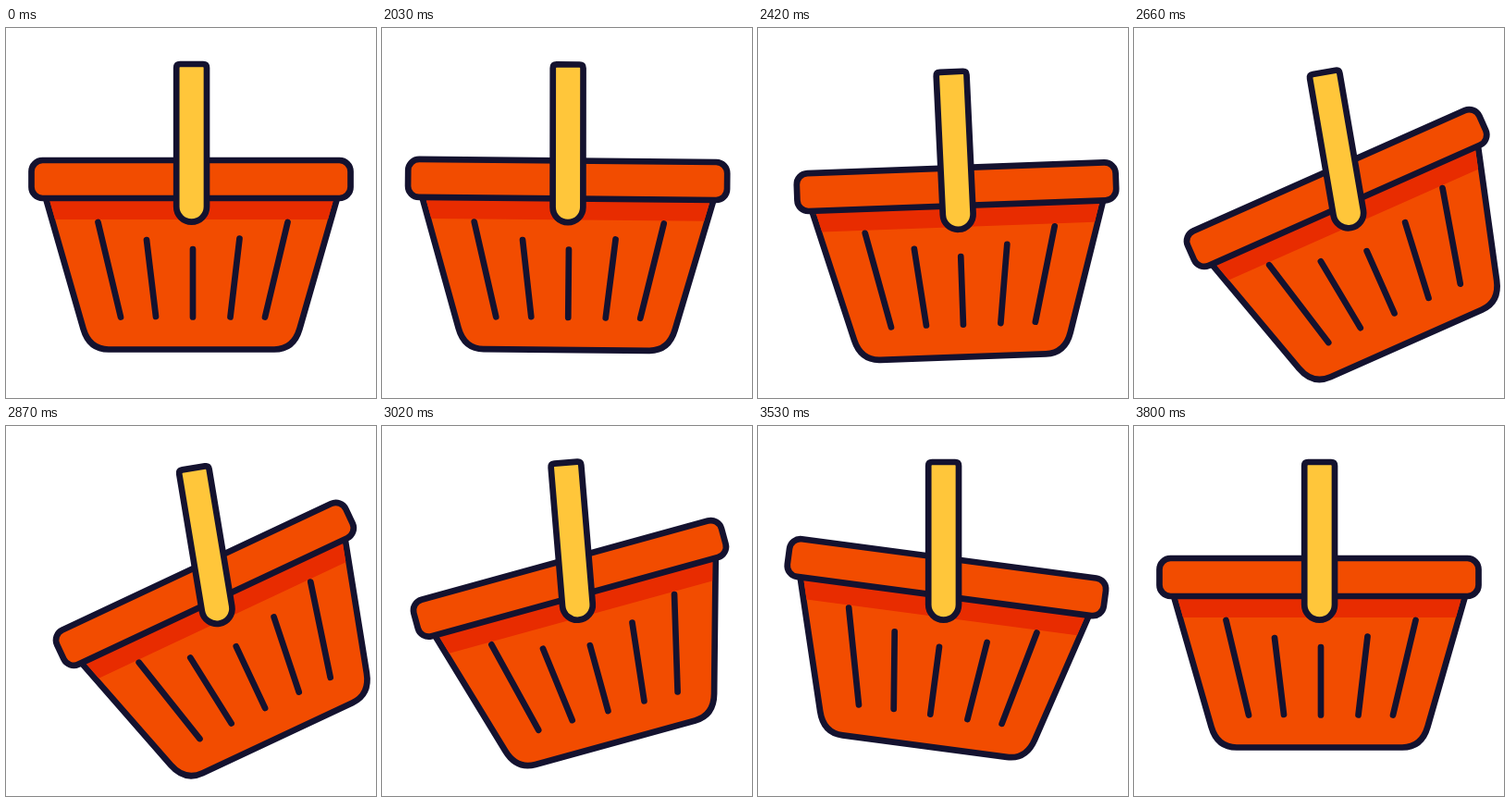
An HTML page that plays this animation: 400 by 400 pixels, repeating every 3830 ms.

```html
<!DOCTYPE html>
<html lang="en">
<head>
<meta charset="utf-8">
<title>Swinging basket</title>
<style>
  html, body { margin: 0; width: 100%; height: 100%; overflow: hidden; background: #fff; }
  svg { display: block; width: 100%; height: 100%; }
  .ink { stroke: #14122f; stroke-width: 6.7; stroke-linecap: round; stroke-linejoin: round; }
</style>
</head>
<body>
<svg viewBox="0 0 400 400">
  <g id="basket" class="ink" fill="#f24c00">
    <path d="M43 184L83.5 325Q90 347.5 111 347.5H290Q311 347.5 317.5 325L358 184Z"/>
    <path stroke="none" fill="#e82c00" d="M46.5 184H354.5L348 207H53Z"/>
    <path d="M99.5 210L124 312.5M152 229L162 312M202 239V312.5M252.5 227.5L242.5 312.5M304.5 210L280 312.5"/>
    <rect x="27.5" y="143" width="345" height="41" rx="12"/>
  </g>
  <path id="handle" class="ink" fill="#ffc63a"
    d="M188.2 39H213Q217 39 217 43V193.2A16.4 16.4 0 0 1 184.2 193.2V43Q184.2 39 188.2 39Z"/>
</svg>
<script>
const LOOP = 3830, PIVOT = '200.6 193.2';
const basket = document.getElementById('basket');
const handle = document.getElementById('handle');

// Smooth progress from 0 to 1 between two times
function ease(t, from, to) {
  const p = Math.min(1, Math.max(0, (t - from) / (to - from)));
  return (1 - Math.cos(Math.PI * p)) / 2;
}

function draw(t) {
  const lift = ease(t, 2000, 2208);
  const pull = ease(t, 2208, 2754);
  const rebound = ease(t, 2797, 3399);
  const settle = ease(t, 3399, 3800);

  const swing = 10 * (lift - settle) - 36.5 * (pull - rebound);
  const tilt = 1.2 * lift - 11.8 * pull + 10.6 * ease(t, 2770, 3240);
  const x = 7 * lift + 26 * pull - 33 * ease(t, 2754, 3190);
  const y = 9 * lift - 2.5 * pull - 6.5 * ease(t, 2754, 3050);

  const pose = (part, angle) =>
    part.setAttribute('transform', `translate(${x} ${y}) rotate(${angle} ${PIVOT})`);
  pose(basket, swing);
  pose(handle, tilt);
}

const start = performance.now();
function tick() {
  draw((performance.now() - start) % LOOP);
  requestAnimationFrame(tick);
}
tick();
</script>
</body>
</html>
```
